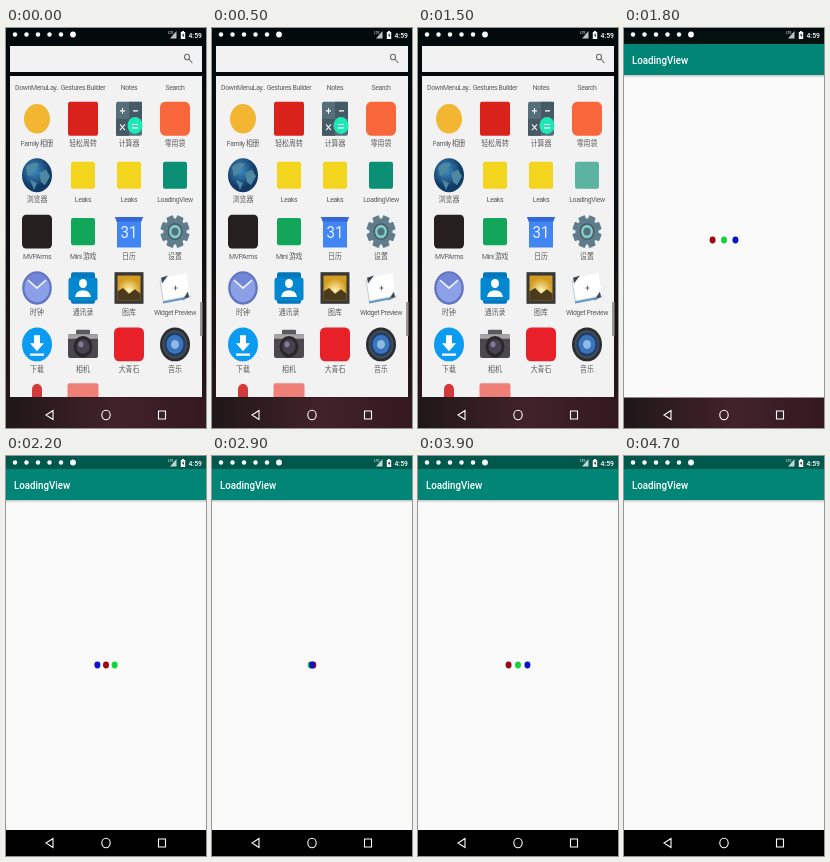
An HTML page for the animation above (5.9 s loop, 200 px wide and 400 px high).

```html
<!DOCTYPE html>
<html lang="zh">
<head>
<meta charset="utf-8">
<title>Loading view</title>
<style>
  html, body { margin: 0; width: 100%; height: 100%; overflow: hidden; background: #000; }
  svg { display: block; width: 100vw; height: 100vh; }
  text { font-family: Roboto, "Noto Sans CJK SC", "Noto Sans CJK", sans-serif; }
  .label { font-size: 6.9px; letter-spacing: -.37px; fill: #5c5c5c; text-anchor: middle; }
  .han { letter-spacing: 0; }
</style>
</head>
<body>
<svg viewBox="0 0 200 400" preserveAspectRatio="none">
  <defs>
    <linearGradient id="backdrop" x2="0" y2="1">
      <stop offset="0" stop-color="#030a0b"/>
      <stop offset=".5" stop-color="#0b0d0e"/>
      <stop offset="1" stop-color="#2b191e"/>
    </linearGradient>
    <linearGradient id="wallpaper">
      <stop offset="0" stop-color="#1f1719"/>
      <stop offset=".55" stop-color="#42222a"/>
      <stop offset="1" stop-color="#33191f"/>
    </linearGradient>
    <linearGradient id="shadow" x2="0" y2="1">
      <stop offset="0" stop-color="#c4c4c4"/>
      <stop offset="1" stop-color="#fafafa"/>
    </linearGradient>
    <radialGradient id="globe" cx=".4" cy=".35">
      <stop offset="0" stop-color="#3f92c8"/>
      <stop offset="1" stop-color="#123a66"/>
    </radialGradient>
    <radialGradient id="sunset" cx=".5" cy=".6">
      <stop offset="0" stop-color="#fff3b0"/>
      <stop offset="1" stop-color="#d39b1f"/>
    </radialGradient>
    <clipPath id="panel"><path d="M4 48H196V369H4z"/></clipPath>
  </defs>

  <g id="launcher">
    <path fill="url(#backdrop)" d="M0 0H200V400H0z"/>
    <path fill="#f2f2f2" d="M4 18H196V44H4zM4 48H196V369H4z"/>
    <g fill="none" stroke="#6c6c6c" stroke-width="1.100">
      <ellipse cx="181" cy="29" rx="2.500" ry="2.800"/>
      <path d="M183 31L186.300 35"/>
    </g>
    <g id="apps" clip-path="url(#panel)"></g>
    <path fill="#999" d="M194 274h2.500v34h-2.500z"/>
  </g>

  <g id="app">
    <path fill="#fafafa" d="M0 13H200V374H0z"/>
    <path id="statusBack" fill="#00574b" d="M0 0H200V13H0z"/>
    <path fill="#008577" d="M0 13H200V44H0z"/>
    <path fill="url(#shadow)" d="M0 44H200V47H0z"/>
    <text transform="translate(8 32.600) scale(1 1.130)" font-size="9.750" font-weight="500" fill="#fff">LoadingView</text>
    <g id="dots">
      <ellipse cy="209" rx="3" ry="3.400"/>
      <ellipse cy="209" rx="3" ry="3.400"/>
      <ellipse cy="209" rx="3" ry="3.400"/>
    </g>
  </g>

  <g id="status" fill="#fff">
    <path d="M164 10.500h6.500V3z" opacity=".75"/>
    <path d="M174.800 4h1.200v-1h2v1h1.200v7h-4.400z"/>
    <path d="M177.300 5l-1.300 2.500h1v2l1.300 -2.700h-1z" fill="#111"/>
    <text x="162" y="5.500" font-size="3.500">LTE</text>
    <text transform="translate(182.500 9.800) scale(1 1.130)" font-size="6.800" font-weight="500">4:59</text>
  </g>

  <path id="navBack"/>
  <g fill="none" stroke="#fff" stroke-width="1.100">
    <path d="M47 382.500V391.500L40 387zM152.500 383h7v8h-7z"/>
    <ellipse cx="100" cy="387" rx="4.200" ry="4.700"/>
  </g>
</svg>

<script>
const byId = id => document.getElementById(id);
const shape = (d, fill) => `<path d="${d}" fill="${fill}"/>`;
const line = (d, stroke, width) =>
  `<path d="${d}" fill="none" stroke="${stroke}" stroke-width="${width}"/>`;
const disc = (r, fill, x = 0, y = 0) => `<circle cx="${x}" cy="${y}" r="${r}" fill="${fill}"/>`;
const box = (x, y, w, h, fill, r = 0) =>
  `<rect x="${x}" y="${y}" width="${w}" height="${h}" rx="${r}" fill="${fill}"/>`;
const tile = (fill, w = 30, r = 2) => box(-w / 2, -w / 2, w, w, fill, r);

// Icons are drawn around their own centre.
function gear() {
  let teeth = '';
  for (let angle = 0; angle < 360; angle += 45)
    teeth += `<g transform="rotate(${angle + 22.5})">${box(-3.5, -14.5, 7, 8, '#607d8b', 1)}</g>`;
  return teeth + disc(11.5, '#607d8b') + disc(7.5, '#455a64') + disc(6, '#80cbc4') + disc(3.5, '#546e7a');
}

const calculator = box(-13, -15, 26, 30, '#546e7a', 2) + box(0, -15, 13, 15, '#455a64') +
  box(-13, 0, 13, 15, '#455a64') +
  line('M-9 -7h5M-6.500 -9.500v5M4 -7h5M-9 5l5 5M-4 5l-5 5', '#fff', 1) +
  disc(7.5, '#1de9b6', 6, 6) + line('M3 5h6M3 8h6', '#fff', 1);
const browser = disc(15, 'url(#globe)') +
  shape('M-11 -7Q-4 -13 2 -10L-2 -5L-5 -1L-9 1zM2 -2L9 -5L13 1L8 9L4 6zM-7 4L0 7L-3 13z', '#4d87a0');
const calendar = shape('M-14 -13H14L12 -8V14H-12V-8z', '#4285f4') +
  shape('M-14 -13H14L12 -9H-12z', '#3367d6') +
  '<text y="6" font-size="15" fill="#e8f0ff" text-anchor="middle">31</text>';
const clock = disc(14.8, '#6274c4') + disc(12.5, '#8ba0e6') +
  shape('M0 0L-10 -8A12.500 12.500 0 0 1 10 -8z', '#7186d6') +
  line('M-9 -7L0 0L9 -7', '#eef1ff', 1.6);
const contacts = box(-12, -14, 24, 28, '#0277bd', 2) + box(-14.5, -9, 29, 20, '#0288d1', 2) +
  disc(4, '#fff', 0, -4) + shape('M-8 8Q-7 2 0 2T8 8z', '#fff');
const gallery = box(-14.5, -14, 29, 28, '#383838') + box(-11.5, -11, 23, 22, 'url(#sunset)') +
  shape('M-11.500 11V3L-6 0L0 5L6 1L11.500 5V11z', '#4b3a1c');
const widget = `<g transform="rotate(-10)">${box(-14, -10, 28, 21, '#c3cbd2', 1)}${box(-13, -11, 27, 20, '#fff', 1)}</g>` +
  shape('M-14 -9l7 -2l-6 7zM14 8l-7 3l6 -8z', '#3e4952') +
  line('M-12 13L11 9', '#5d93c4', 1.5) + line('M-1.500 0h4M.500 -2v4', '#555', .8);
const download = disc(15, '#0b9bf0') + shape('M-3 -8H3V-1H7L0 6L-7 -1H-3zM-7 8H7V10H-7z', '#fff');
const camera = box(-15, -9, 30, 21, '#4a484c', 2) + box(-7, -13, 14, 6, '#5c595e', 1) +
  box(-15, -9, 30, 4, '#a5a4a6') + disc(9.5, '#2a282c', 0, 2) + disc(6.5, '#47424f', 0, 2) +
  disc(2.5, '#817b94', -2, 0);
const music = disc(15, '#2a2d31') + disc(12.5, '#464b52') + disc(10.5, '#1d3c68') +
  disc(8.5, '#3a74bd') + disc(4, '#8fb9e2');
const pressable = `<g id="pressable">${tile('#0c9075', 24)}</g>`;

const rows = [
  [['', 'DownMenuLay..'], ['', 'Gestures Builder'], ['', 'Notes'], ['', 'Search']],
  [[disc(13, '#f2b632'), 'Family 相册'], [tile('#d9221c'), '轻松周转'],
   [calculator, '计算器'], [tile('#f8673c', 30, 5), '零用袋']],
  [[browser, '浏览器'], [tile('#f4d51e', 24), 'Leaks'], [tile('#f4d51e', 24), 'Leaks'],
   [pressable, 'LoadingView']],
  [[tile('#25201f', 30, 4), 'MVPArms'], [tile('#12a65a', 24), 'Mini 游戏'],
   [calendar, '日历'], [gear(), '设置']],
  [[clock, '时钟'], [contacts, '通讯录'], [gallery, '图库'], [widget, 'Widget Preview']],
  [[download, '下载'], [camera, '相机'], [tile('#e8202a', 30, 5), '大青石'], [music, '音乐']],
  [[box(-5, -15, 10, 24, '#d3393a', 5), ''], [tile('#ee8078', 31), '']]
];

byId('apps').innerHTML = rows.map((row, r) => row.map(([icon, label], c) => {
  const x = 31 + 46 * c, y = 34.4 + 56.4 * r;
  const style = /[a-z]/i.test(label) ? 'label' : 'label han';
  return `<g transform="translate(${x} ${y}) scale(1 1.13)">${icon}` +
    `<text class="${style}" y="24">${label}</text></g>`;
}).join('')).join('');

byId('status').innerHTML += [9, 20.5, 32, 43.5, 55, 67]
  .map((x, i) => disc(i === 5 ? 2.9 : 2.2, '#fff', x, 6.5)).join('');

const LOOP = 5900, PRESS = 1500, OPEN = 1800, SETTLED = 1900, GONE = 4700;
const HALF = 420, SPREAD = 14, MEETING = 2880;
const colors = ['#9b0712', '#12d43a', '#0a12cc'];
const dots = [...byId('dots').children];
const mod = (n, m) => (n % m + m) % m;

function drawDots(time) {
  const elapsed = time - MEETING;
  const phase = mod(elapsed, 2 * HALF) / HALF;
  const offset = SPREAD * (1 - (1 - phase) ** 2);
  // The colours move one place to the right whenever the dots meet.
  const turn = Math.floor(elapsed / (2 * HALF)) + 2;
  [[-1, 0], [1, 2], [0, 1]].forEach(([side, place], i) => {
    dots[i].setAttribute('cx', 100 + side * offset);
    dots[i].setAttribute('fill', colors[mod(place - turn, 3)]);
  });
}

function show(id, visible) {
  byId(id).style.display = visible ? '' : 'none';
}

function draw(now) {
  const time = Math.floor(now % LOOP / 100) * 100;
  const opened = time >= OPEN, settled = time >= SETTLED;
  show('launcher', !settled);
  show('app', opened);
  show('dots', time < GONE);
  byId('pressable').setAttribute('opacity', time >= PRESS ? .65 : 1);
  byId('app').setAttribute('transform', `translate(0 ${settled ? 0 : 3})`);
  byId('statusBack').setAttribute('fill', settled ? '#00574b' : '#03100e');
  byId('navBack').setAttribute('d', `M0 ${settled ? 374 : 369.5}H200V400H0z`);
  byId('navBack').setAttribute('fill', settled ? '#000' : 'url(#wallpaper)');
  drawDots(time);
}

const start = performance.now();
function tick() {
  draw(performance.now() - start);
  requestAnimationFrame(tick);
}
tick();
</script>
</body>
</html>
```
